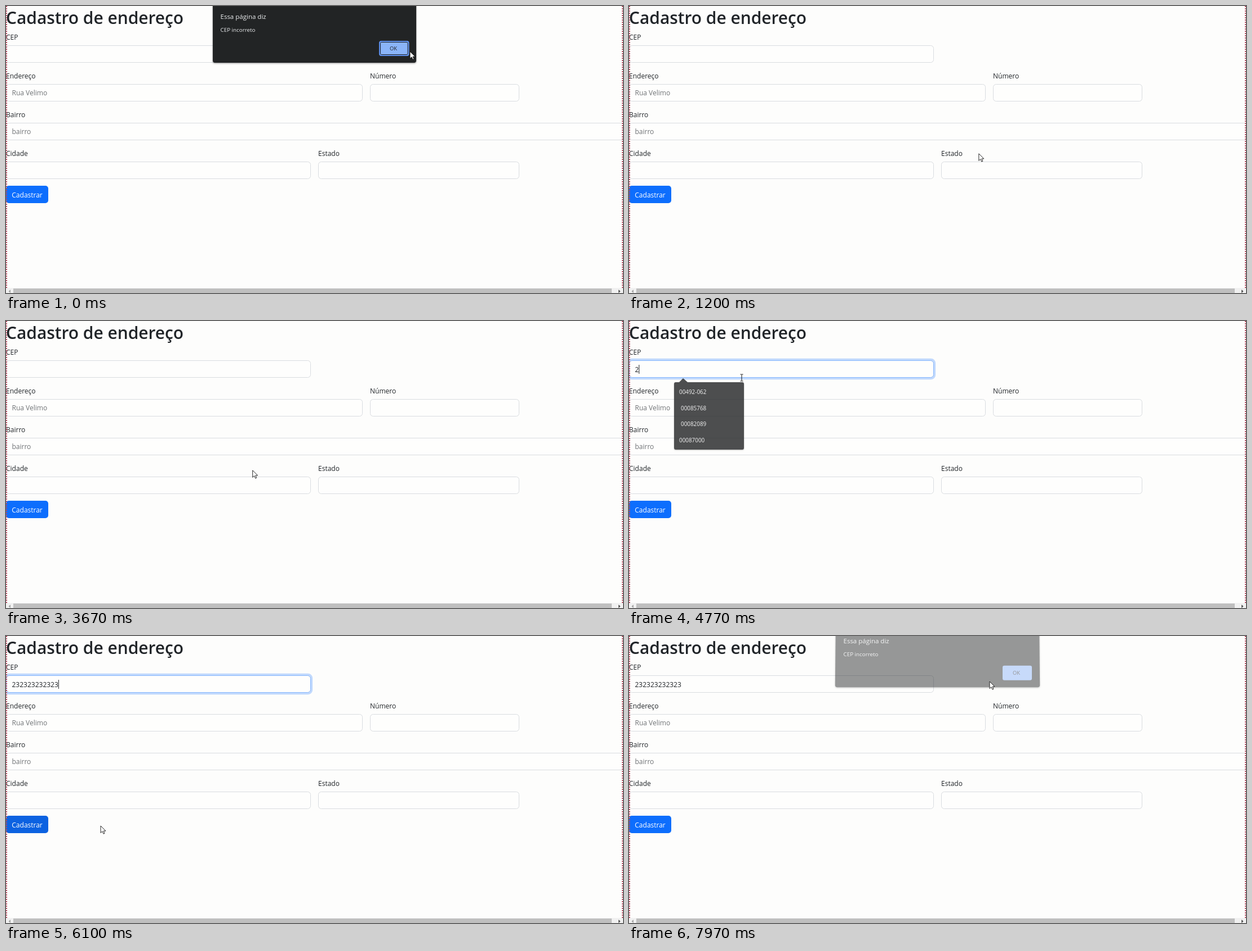
Recreate the animation shown at these times as an HTML page. Size 1095x511 px, loop 8000 ms.

```html
<!DOCTYPE html>
<html lang="pt-BR">
<head>
<meta charset="utf-8">
<title>Cadastro de endereço</title>
<style>
  html, body { margin: 0; width: 100%; height: 100%; overflow: hidden; background: #fdfdfc; }
  svg { display: block; }
  text { font: 12px "Open Sans", "Noto Sans", sans-serif; fill: #212529; white-space: pre; }
  text.title { font-size: 29.9px; font-weight: 600; }
  .hint text { fill: #6f7275; }
  .field { fill: #fefefd; stroke: #d9dce0; }
  #focus rect { fill: none; }
  #dialog { filter: drop-shadow(0 1px 1.5px rgba(0, 0, 0, .45)); }
  #dialog text { fill: #eceef0; font-size: 9.8px; }
  #dialog text.head { font-size: 11.5px; }
  #dialog text.ok { fill: #202124; font-size: 9.3px; }
  #list { filter: drop-shadow(0 1px 1px rgba(0, 0, 0, .3)); }
  #list text { fill: #f1f1f1; font-size: 9.9px; }
</style>
</head>
<body>
<svg width="1095" height="511" viewBox="0 0 1095 511">
  <rect width="1095" height="511" fill="#fdfdfc"/>
  <text class="title" x="0" y="32">Cadastro de endereço</text>
  <g id="labels"></g>
  <g id="fields"></g>
  <g class="hint">
    <text x="10.5" y="159">Rua Velimo</text>
    <text x="10.5" y="228">bairro</text>
  </g>
  <g id="focus">
    <rect x="-1.5" y="68.5" width="544" height="34" rx="6.5" stroke="#0d6efd" stroke-opacity=".25" stroke-width="3.3"/>
    <rect x=".5" y="70.5" width="540" height="30" rx="5" stroke="#86b7fe"/>
  </g>
  <text id="value" x="10.5" y="90.5"></text>
  <rect id="caret" y="78" width="1" height="16" fill="#212529"/>
  <rect id="button" y="320" width="75" height="31" rx="5"/>
  <text x="10.3" y="340.5" style="fill:#fff">Cadastrar</text>

  <path d="M1 0V502M1094 0V502" stroke="#b4485e" stroke-width="2" stroke-dasharray="2 2"/>
  <rect y="502" width="1095" height="9" fill="#f1f1f1"/>
  <rect x="13" y="503" width="1062" height="8" fill="#bfbfbf"/>
  <path d="M8 505V511L4.500 508Z" fill="#a3a3a3"/>
  <path d="M1087 505V511L1090.500 508Z" fill="#505050"/>

  <g id="list">
    <path d="M83 109H89L96 102L104 109H201Q204 109 204 112V226Q204 229 201 229H83Q80 229 80 226V112Q80 109 83 109Z" fill="#2c2d2f"/>
    <text x="89" y="130">00492-062</text>
    <text x="92" y="158.500">00085768</text>
    <text x="92" y="187">00082089</text>
    <text x="89" y="216">00087000</text>
  </g>

  <g id="dialog">
    <path id="panel" fill="#222425"/>
    <text class="head" x="380.500" y="23">Essa página diz</text>
    <text x="380.500" y="45.500">CEP incorreto</text>
    <rect x="663" y="62.500" width="52" height="26" rx="3" fill="#8ab4f8"/>
    <g id="okRing" fill="none">
      <rect x="663" y="63" width="51.500" height="25" rx="3" stroke="#5f92f2" stroke-width="2"/>
      <rect x="664.500" y="64.500" width="48.500" height="22" rx="2" stroke="#222425"/>
    </g>
    <text class="ok" x="681" y="78.500">OK</text>
  </g>

  <path id="arrow" d="M0 0V12.500L3 9.800L5 14.300L7 13.400L5.100 9.100H9Z" fill="#fff" stroke="#111" stroke-width=".9"/>
  <path id="beam" d="M-2.500 -6H-.6L0 -5.500L.6 -6H2.500M0 -5.500V5.500M-2.500 6H-.6L0 5.500L.6 6H2.500" fill="none" stroke="#111"/>
</svg>
<script>
const $ = id => document.getElementById(id);
const LOOP = 8000;
const clamp = v => Math.max(0, Math.min(1, v));
const ramp = (t, start, length) => clamp((t - start) / length);
const show = (id, alpha) => $(id).setAttribute('opacity', alpha);

// label, x, width, top of the input
const fields = [
  ['CEP', 0, 541, 70], ['Endereço', 0, 633, 139], ['Número', 646, 265, 139],
  ['Bairro', 0, 1110, 208], ['Cidade', 0, 541, 277], ['Estado', 554, 357, 277]
];
for (const [label, x, w, y] of fields) {
  $('labels').innerHTML += `<text x="${x}" y="${y - 10.5}">${label}</text>`;
  $('fields').innerHTML += `<rect class="field" x="${x + .5}" y="${y + .5}" width="${w - 1}" height="30" rx="5"/>`;
}

// pointer path: time, x, y
const path = [
  [0, 717, 81], [420, 688, 84], [700, 688, 84], [1500, 590, 345], [2170, 571, 393],
  [2600, 569, 400], [3000, 560, 392], [3370, 500, 332], [4250, 270, 88], [4450, 235, 90],
  [4770, 200, 101], [5450, 200, 101], [5800, 52, 336], [5980, 58, 338], [6100, 168, 338],
  [6300, 200, 348], [6700, 200, 348], [7100, 683, 61], [7300, 748, 72], [7530, 737, 77],
  [7780, 675, 81], [7860, 668, 81], [7970, 640, 81], [8000, 636, 82]
];
function pointerAt(t) {
  const i = path.findIndex(p => p[0] > t);
  const [a, b] = [path[i - 1], path[i]];
  const p = ramp(t, a[0], b[0] - a[0]), k = p * p * (3 - 2 * p);
  return [a[1] + (b[1] - a[1]) * k, a[2] + (b[2] - a[2]) * k];
}

const typeStart = 4740, keyGap = 85, keys = '232323232323';
const typeEnd = typeStart + keyGap * (keys.length - 1);
const focusAt = 4300, alertAt = 6430, closeAt = [504, 7864];

function drawField(t) {
  const count = t < typeStart ? 0 : Math.min(keys.length, 1 + Math.floor((t - typeStart) / keyGap));
  $('value').textContent = keys.slice(0, count);
  show('focus', ramp(t, focusAt, 150) * (1 - ramp(t, 7800, 150)));
  const since = t < typeStart ? t - focusAt : Math.max(0, t - typeEnd);
  const blink = Math.floor(since / 500) % 2 === 0;
  show('caret', t >= focusAt && t < alertAt && blink ? 1 : 0);
  $('caret').setAttribute('x', count ? 10.5 + $('value').getComputedTextLength() : 10);
  show('list', ramp(t, 4480, 100) * (1 - ramp(t, 4747, 150)));
}

function drawDialog(t) {
  const opening = t > alertAt - 1;
  const closing = ramp(t, closeAt[opening ? 1 : 0], 200);
  const alpha = (opening ? ramp(t, alertAt, 200) : 1) * (1 - closing);
  const tilt = 1 - alpha ** 4.5;
  show('dialog', alpha);
  show('okRing', closing ? 0 : 1);
  $('dialog').setAttribute('transform', `translate(0 ${-10 * tilt})`);
  const l = 367 - 1.2 * tilt, r = 728 + 1.2 * tilt;
  $('panel').setAttribute('d', `M367 -20H728L${r} 97Q${r} 101 ${r - 4} 101H${l + 4}Q${l} 101 ${l} 97Z`);
  return alpha > 0;
}

function drawPointer(t, modal) {
  const [x, y] = pointerAt(t);
  const typing = t > 4800 && t < 5450;
  const inField = !modal && fields.some(([, fx, w, fy]) => x >= fx && x <= fx + w && y >= fy && y <= fy + 31);
  show('beam', inField && !typing ? 1 : 0);
  show('arrow', inField || typing ? 0 : 1);
  $('arrow').setAttribute('transform', `translate(${x} ${y})`);
  $('beam').setAttribute('transform', `translate(${Math.round(x)} ${Math.round(y)})`);
}

function draw(now) {
  const t = now % LOOP;
  drawField(t);
  drawPointer(t, drawDialog(t));
  const hover = ramp(t, 5720, 150) * (1 - ramp(t, 6060, 150));
  $('button').setAttribute('fill', `rgb(${13 - 2 * hover} ${110 - 16 * hover} ${253 - 38 * hover})`);
}

const begin = performance.now();
function tick() {
  draw(performance.now() - begin);
  requestAnimationFrame(tick);
}
tick();
</script>
</body>
</html>
```
